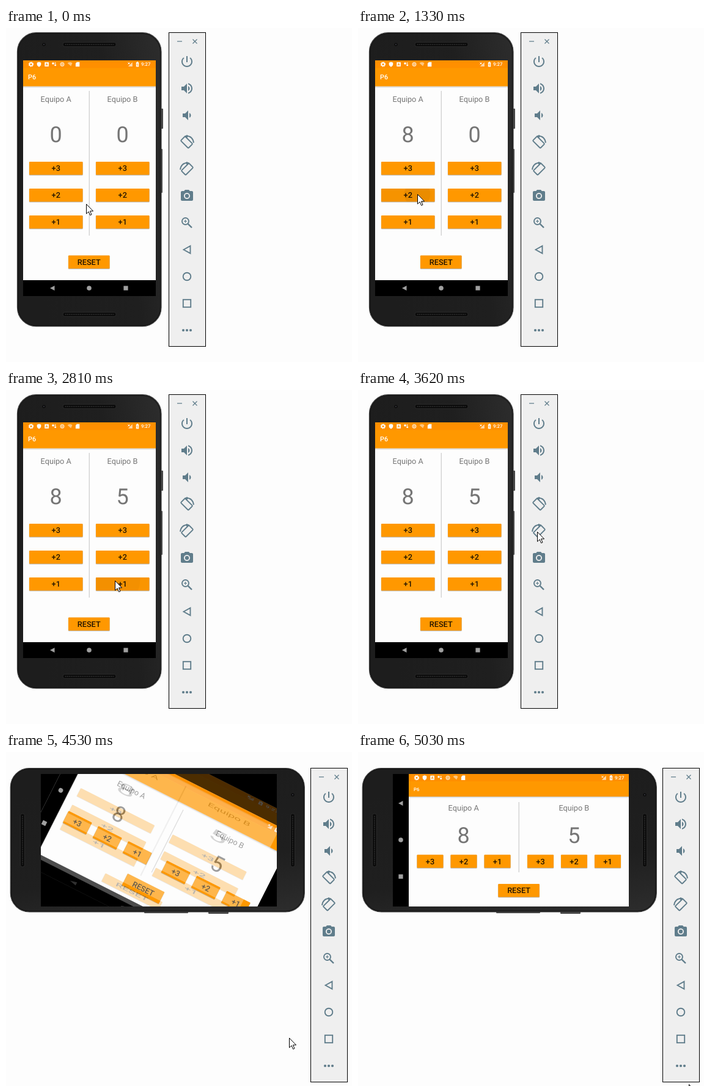
These frames come from a looping animation (566 by 547 pixels, 5340 ms). An HTML page:

```html
<!DOCTYPE html>
<html lang="es">
<head>
<meta charset="utf-8">
<title>Marcador</title>
<style>
  html, body { margin: 0; width: 100%; height: 100%; overflow: hidden; background: #fdfdfd; }
  svg { display: block; position: absolute; left: 0; top: 0; }
  text { font-family: Roboto, "Open Sans", sans-serif; text-rendering: geometricPrecision; }
  .mid { text-anchor: middle; }
  .name { font-size: 12.7px; fill: #757575; }
  .score { font-size: 36px; fill: #757575; }
  .label { font-size: 12.7px; font-weight: 500; fill: #221400; }
  .line { fill: none; stroke: #607d8b; stroke-width: 1.9; }
</style>
</head>
<body>
<svg id="stage" width="566" height="547" viewBox="0 0 566 547"></svg>
<script>
const LOOP = 5340, TURN = 3700, SPIN = 4444, SPIN_MS = 400;

const TICKS = [0, 60, 140, 210, 280, 510, 590, 730, 810, 890, 950, 1030,
  1170, 1250, 1320, 1400, 1480, 1550, 1630, 1910, 1990, 2070, 2130, 2210, 2290, 2370, 2430,
  2510, 2590, 2650, 2810, 2890, 2960, 3030, 3100, 3180, 3250, 3560, 3620, 3700,
  4080, 4150, 4230, 4300, 4370, 4450, 4530, 4590, 4670, 4750, 4820, 4890, 5030];

// Pointer moves: start, end, target x, target y
const MOVES = [[0, 280, 97, 229], [810, 1030, 97, 272], [1320, 1630, 181, 272],
  [2210, 2430, 178, 312], [2810, 3250, 293, 232], [4010, 4370, 418, 402],
  [4370, 4530, 463, 468], [4530, 4670, 506, 526], [4890, 5030, 541, 544]];

// Button presses: start, end, button x, button y
const PRESSES = [[510, 950, 38, 219], [1170, 1480, 38, 263],
  [1910, 2290, 147, 263], [2510, 2890, 147, 307]];

const SCORES = {
  a: [[0, 0], [590, 3], [810, 6], [1250, 8]],
  b: [[0, 0], [1990, 2], [2210, 4], [2810, 5]]
};

const rect = (x, y, w, h, fill, more = '') =>
  `<rect x="${x}" y="${y}" width="${w}" height="${h}" fill="${fill}" ${more}/>`;
const circle = (x, y, r, fill, more = '') =>
  `<circle cx="${x}" cy="${y}" r="${r}" fill="${fill}" ${more}/>`;
const path = (d, more = '') => `<path d="${d}" ${more}/>`;
const text = (x, y, s, cls, more = '') => `<text x="${x}" y="${y}" class="${cls}" ${more}>${s}</text>`;
const group = (more, body) => `<g ${more}>${body}</g>`;
const at = (x, y, body) => group(`transform="translate(${x} ${y})"`, body);

const button = (x, y, w, s) =>
  rect(x - .5, y, w + 1, 22.8, '#000', 'rx="1.5" opacity=".1"') +
  rect(x, y + .8, w, 21.5, '#000', 'rx="1" opacity=".22"') +
  rect(x, y, w, 21.5, '#ff9800', 'rx="1"') +
  text(x + w / 2, y + 15.4, s, 'mid label');

const noticeIcons =
  circle(41, 59.5, 2.4, 'none', 'stroke="#fff" stroke-width="1.7"') +
  circle(41, 59.5, 3.6, 'none', 'stroke="#fff" stroke-width="1.2" stroke-dasharray="1.6 1.23"') +
  path('M54 55.5l3.3 1.3v2.5q0 3-3.3 4.4q-3.3-1.4-3.3-4.4v-2.5z', 'fill="#fff"') +
  rect(63.3, 56, 6.6, 7, '#fff', 'rx=".6"') +
  path('M65 61.5l1.6-4 1.6 4M65.6 60.3h2', 'stroke="#ff8f00" fill="none" stroke-width=".9"') +
  circle(77, 58, 1.8, '#fff') + circle(80.6, 57.6, 1, '#fff') + circle(80.7, 60.8, 1.5, '#fff') +
  circle(92, 59.5, 3.2, '#fff', 'fill-opacity=".45" stroke="#fff" stroke-opacity=".7" stroke-width=".9"') +
  path('M100.5 57.5q4-2.8 8 0l-2.3 5z', 'fill="#fff" opacity=".5"') +
  path('M116 55.8h4.3v7.4h-6.4v-5.2z', 'fill="#fff"');

const systemIcons =
  path('M206.8 56v7h-7z', 'fill="#fff" opacity=".65"') +
  path('M199.5 56.5l3 3m0-3l-3 3', 'stroke="#fff" stroke-width="1"') +
  path('M214.2 55.3h1.8v.9h1.2v7.3h-4.4v-7.3h1.4z', 'fill="#fff"') +
  path('M215.4 57.5l-1.3 2.6h1.8l-1.2 2.4', 'stroke="#ff8f00" stroke-width=".7" fill="none"') +
  text(221, 62.4, '9:27', '', 'font-size="7.8" font-weight="500" fill="#fff"');

function bars(x, y, w, statusH, barH, title, tx, ty, size) {
  const end = y + statusH + barH;
  return rect(x, end, w, 2.4, '#000', 'opacity=".07"') + rect(x, end, w, 1.1, '#000', 'opacity=".12"') +
    rect(x, y, w, statusH + .5, '#ff8f00') + rect(x, y + statusH, w, barH, '#ff9800') +
    text(tx, ty, title, '', `font-size="${size}" font-weight="500" fill="#fff"`);
}

const navIcons = (back, home, recent) =>
  at(...back, path('M-4 0L3.5-4v8z', 'fill="#a0a0a0"')) +
  circle(...home, 3.8, '#a0a0a0') +
  rect(recent[0] - 3.6, recent[1] - 3.6, 7.2, 7.2, '#a0a0a0');

function portrait() {
  let s = rect(28, 53, 217, 386, '#fdfdfd') +
    bars(28, 53, 217, 12.5, 30, 'P6', 36, 84, 10.8) + noticeIcons + systemIcons +
    rect(135.6, 103, 1.3, 237, '#cfcfcf');
  [['A', 81.7, 38], ['B', 190.5, 147]].forEach(([n, cx, bx]) => {
    s += text(cx, 121, 'Equipo ' + n, 'mid name') +
      text(cx, 187, '0', 'mid score', `data-team="${n.toLowerCase()}"`);
    [3, 2, 1].forEach((v, i) => s += button(bx, 219 + 44 * i, 87.5, '+' + v));
  });
  return s + button(102, 372.5, 67.5, 'RESET') +
    group('id="press" clip-path="url(#key)"',
      rect(0, 0, 87.5, 21.5, '#000', 'id="tint" opacity=".035"') + circle(0, 0, 1, '#000', 'id="drop" opacity=".05"')) +
    rect(28, 413, 217, 26, '#000') + navIcons([76, 426], [136, 426], [196, 426]);
}

function landscape() {
  let s = rect(57, 36, 386, 217, '#fdfdfd') +
    bars(83, 36, 360, 12, 25, 'P6', 91, 64, 7.8) +
    at(55, -17.3, noticeIcons) + at(199, -17.3, systemIcons) +
    rect(262.6, 82, 1.3, 115, '#cfcfcf');
  [['A', 8, 172.7, 96.5], ['B', 5, 353.3, 277]].forEach(([n, v, cx, bx]) => {
    s += text(cx, 95.5, 'Equipo ' + n, 'mid name') + text(cx, 148.5, v, 'mid score');
    [3, 2, 1].forEach((v, i) => s += button(bx + 55 * i, 168.2, 43, '+' + v));
  });
  return s + button(229.3, 216, 67.5, 'RESET') +
    rect(57, 36, 26, 217, '#000') + navIcons([70, 84], [70, 144], [70, 204]);
}

function phone() {
  const grille = y => rect(93, y, 87, 7, '#0c0c0c', 'rx="3" stroke="#303030" stroke-width=".8"') +
    path(`M97 ${y + 3.5}H176`, 'stroke="#2a2a2a" stroke-width="2" stroke-dasharray="1.5 1.5"');
  return rect(252, 132, 5, 33, '#484848', 'rx="1"') + rect(252, 198, 4, 72, '#484848', 'rx="1"') +
    rect(18.5, 7.7, 235.5, 481, 'url(#shell)', 'rx="31" stroke="#414141" stroke-width="1.2"') +
    rect(20, 9.2, 232.5, 478, 'none', 'rx="29.5" stroke="#161616" stroke-width="1.2"') +
    grille(23.5) + grille(465.5) +
    circle(62, 27, 2.6, '#0b0b0b') + circle(62, 27, 1.1, '#3b3b44') +
    rect(28, 53, 217, 386, '#000');
}

function toolbar() {
  const blue = 'fill="#607d8b"';
  const icon = (y, body) => at(296, y, body);
  const glyph = (y, d) => icon(y, path(d, `${blue} fill-rule="evenodd" transform="translate(-12 -12)"`));
  const wave = 'M18.5 12c0-1.77-1.02-3.29-2.5-4.03v8.05c1.48-.73 2.5-2.25 2.5-4.02z';
  const turn = `<g transform="rotate(45)"><rect x="-9" y="-4.6" width="17.5" height="10" rx="1.2" class="line"/></g>` +
    path('M-1-10.3Q9.5-10 11 1', 'class="line" stroke-width="1.6"') + path('M-4-10.3l5-1.6v4.6z', blue);
  return rect(266.5, 7.5, 60, 514, '#efefef', 'stroke="#000"') +
    path('M280 21.8h8M305.5 18.5l7 7m0-7l-7 7', 'stroke="#607d8b" stroke-width="1.3"') +
    glyph(55, 'M13 3h-2v10h2V3zm4.83 2.17l-1.42 1.42C17.99 7.86 19 9.81 19 12c0 3.87-3.13 7-7 7s-7-3.13-7-7c0-2.19 1.01-4.14 2.58-5.42L6.17 5.17C4.23 6.82 3 9.26 3 12c0 4.97 4.03 9 9 9s9-4.03 9-9c0-2.74-1.23-5.18-3.17-6.83z') +
    glyph(99, 'M3 9v6h4l5 5V4L7 9H3zm13.5 3c0-1.77-1.02-3.29-2.5-4.03v8.05c1.48-.73 2.5-2.25 2.5-4.02zM14 3.23v2.06c2.89.86 5 3.54 5 6.71s-2.11 5.85-5 6.71v2.06c4.01-.91 7-4.49 7-8.77s-2.99-7.86-7-8.77z') +
    glyph(143, wave + 'M5 9v6h4l5 5V4L9 9H5z') +
    icon(187, turn) +
    icon(231, group('transform="scale(-1 1)"', turn)) +
    glyph(275, 'M9 2L7.17 4H4c-1.1 0-2 .9-2 2v12c0 1.1.9 2 2 2h16c1.1 0 2-.9 2-2V6c0-1.1-.9-2-2-2h-3.17L15 2H9zm3 15c-2.76 0-5-2.24-5-5s2.24-5 5-5 5 2.24 5 5-2.24 5-5 5z') +
    icon(275, circle(0, 0, 3.2, '#607d8b')) +
    icon(319, circle(-2.5, -2.5, 5.5, 'none', 'class="line"') +
      path('M1.8 1.8L8 8', 'class="line" style="stroke-width:2.4"') +
      path('M-5-2.5h5M-2.5-5v5', 'class="line" style="stroke-width:1.2"')) +
    icon(363, path('M-5.5 0L5.5-6.2V6.2z', 'class="line"')) +
    icon(407, circle(0, 0, 6.3, 'none', 'class="line"')) +
    icon(451, rect(-6.2, -6.2, 12.4, 12.4, 'none', 'class="line"')) +
    icon(495, [-6, 0, 6].map(x => circle(x, 0, 2.1, '#607d8b')).join(''));
}

const $ = id => document.getElementById(id);
$('stage').innerHTML = `<defs>
  <linearGradient id="shell" x1="0" y1=".3" x2="1" y2="0">
    <stop offset="0" stop-color="#1d1d1d"/><stop offset=".6" stop-color="#1f1f1f"/>
    <stop offset="1" stop-color="#2d2d2d"/></linearGradient>
  <clipPath id="view"><rect id="viewBox"/></clipPath>
  <clipPath id="key"><rect id="keyBox" width="87.5" height="21.5" rx="1"/></clipPath></defs>` +
  rect(0, 0, 566, 547, '#fdfdfd') + group('id="phone"', phone()) +
  group('clip-path="url(#view)"', group('id="wide"', landscape()) + group('id="tall"', portrait())) +
  group('id="tools"', toolbar()) +
  path('M.5.5V16.2L4.1 12.8 6.6 18.6 9 17.6 6.5 11.9H11.6z', 'id="pointer" fill="#fff" stroke="#000" stroke-width="1"');

const set = (id, attrs) => { for (const k in attrs) $(id).setAttribute(k, attrs[k]); };
const last = (list, t) => list.filter(([when]) => when <= t).pop()[1];

function pointerAt(t) {
  let x = 131, y = 288;
  for (const [from, to, tx, ty] of MOVES) {
    if (t <= from) break;
    const k = Math.min(1, (t - from) / (to - from));
    x += (tx - x) * k;
    y += (ty - y) * k;
  }
  return [Math.round(x), Math.round(y)];
}

// Places portrait coordinates on the sideways device, p = progress of the screen turn
const sideways = p => `translate(250 144.5) rotate(${90 * (1 - p)}) ` +
  `scale(${1 + p * (386 / 217 - 1)} ${1 + p * (217 / 386 - 1)}) translate(-136.5 -246)`;

function drawPress(t) {
  const hit = PRESSES.find(([from, to]) => t >= from && t < to);
  set('press', { opacity: hit ? Math.min(1, (hit[1] - t) / 140) : 0 });
  if (!hit) return;
  const [from, , x, y] = hit, [cx, cy] = pointerAt(from);
  set('keyBox', { x, y });
  set('tint', { x, y });
  set('drop', { cx, cy, r: 1 + (t - from) * .135 });
}

function draw(now) {
  const t = TICKS.filter(v => v <= now).pop();
  const turned = t >= TURN;
  const p = 1 - (1 - Math.min(1, Math.max(0, (t - SPIN) / SPIN_MS))) ** 5;
  set('phone', { transform: turned ? sideways(0) : '' });
  set('tall', { transform: turned ? sideways(p) : '', opacity: 1 - p });
  set('wide', { transform: `rotate(${90 * (1 - p)} 250 144.5)`, opacity: p > 0 ? 1 : 0 });
  set('viewBox', turned ? { x: 57, y: 36, width: 386, height: 217 } : { x: 28, y: 53, width: 217, height: 386 });
  set('tools', { transform: turned ? 'translate(232 19)' : '' });
  set('pointer', { transform: `translate(${pointerAt(t)})` });
  document.querySelectorAll('[data-team]').forEach(el => el.textContent = last(SCORES[el.dataset.team], t));
  drawPress(t);
}

const start = performance.now();
function loop() {
  draw((performance.now() - start) % LOOP);
  requestAnimationFrame(loop);
}
loop();
</script>
</body>
</html>
```
